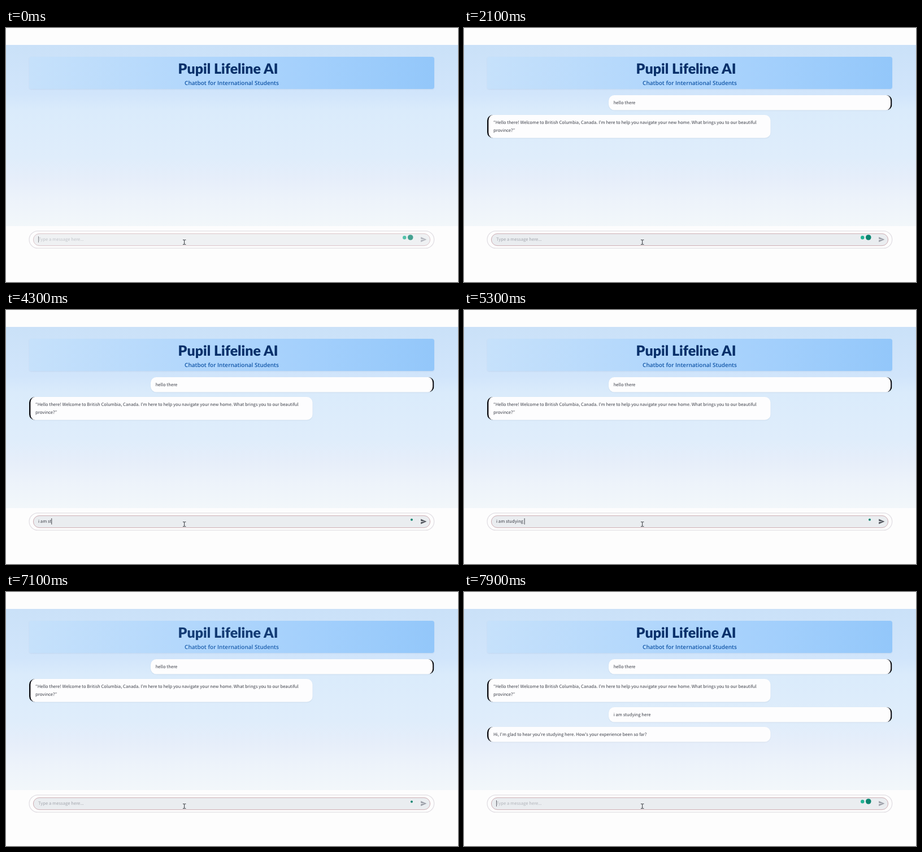
These frames come from a looping animation (800 by 450 pixels, 8000 ms). An HTML page:

```html
<!DOCTYPE html>
<html lang="en">
<head>
<meta charset="utf-8">
<title>Student chatbot</title>
<style>
html, body { margin: 0; width: 100%; height: 100%; overflow: hidden; background: #fdfdfd; }
#stage { position: relative; width: 800px; height: 450px; overflow: hidden; background: #fdfdfd; }
#stage > * { position: absolute; box-sizing: border-box; }
.sky {
  left: 0; top: 30px; width: 800px; height: 321px;
  background: linear-gradient(#cae1f8, #d1e5fb 27%, #daebfb 36%, #dfedfb 62%, #e6eefa 74%, #edf3fa 86%, #f2f7fa);
}
.header {
  left: 41px; top: 51px; width: 716.5px; height: 56.5px; border-radius: 4px;
  background: linear-gradient(90deg, #c6e1fb, #b2d7fc 40%, #a2cffc 72%, #93c7fa);
  box-shadow: 0 1px 2px rgba(60, 100, 160, .1);
}
/* Drawn larger and scaled down, so the dark edge can be 2.4px wide. */
.bubble {
  width: 627px; background: #fdfdfe; border-radius: 12.5px;
  box-shadow: 0 1px 2px rgba(40, 60, 90, .1);
  transform: scale(.8); transform-origin: 0 0;
}
.user { left: 256px; border-right: 3px solid #0b0b10; }
.bot { left: 41px; border-left: 3px solid #0b0b10; }
svg { left: 0; top: 0; }
text {
  font: 7.7px "Noto Sans CJK JP", "Noto Sans CJK SC", "Noto Sans CJK", "Open Sans", sans-serif;
  fill: #3c3f48; white-space: pre; text-rendering: geometricPrecision;
}
.title { font: 900 25px Lato, "Open Sans", sans-serif; fill: #08306a; }
.subtitle { font: 600 10px "Open Sans", "Noto Sans", sans-serif; fill: #1156a8; }
.middle { text-anchor: middle; }
#hint { fill: #a3a6ad; }
</style>
</head>
<body>
<div id="stage">
  <div class="sky"></div>
  <div class="header"></div>
  <svg id="art" width="800" height="450" viewBox="0 0 800 450">
    <rect x="41.1" y="359.6" width="716.6" height="30.6" rx="15.3" fill="#fdfdfd" stroke="#e2dfe4" stroke-width="1.3"/>
    <rect id="field" x="48.4" y="364.4" width="702.2" height="21.2" rx="10.6" fill="#eaedf0" stroke="#c8a4ab" stroke-width=".9"/>
    <g id="heading">
      <text class="title middle" x="393" y="81">Pupil Lifeline AI</text>
      <text class="subtitle middle" x="399.5" y="101.3">Chatbot for International Students</text>
    </g>
    <text id="hint" x="57" y="377.4">Type a message here...</text>
    <text id="typed" x="57" y="377.4"></text>
    <rect id="caret" y="369" width="0.9" height="11" fill="#30333b"/>
    <g id="badges">
      <circle cx="705.3" cy="371.3" r="3.2" fill="#22b394"/>
      <circle cx="715.8" cy="371" r="4.8" fill="#0c8570"/>
    </g>
    <circle id="dot" cx="718" cy="371.4" r="2" fill="#0c8570"/>
    <path id="send" transform="translate(733.2 368.9) scale(.49)" d="M2 21 23 12 2 3v7l15 2-15 2z"/>
    <path d="M313 375.4h2l.7.5.7-.5h2M315.7 375.6v7.8M313 383.4h2l.7-.5.7.5h2" fill="none" stroke="#33363c"/>
  </svg>
</div>
<script>
const LOOP = 8000, SENT = 6800, REPLY = 7500;
const el = id => document.getElementById(id);
const [stage, art, field, heading, hint, typed, caret, badges, dot, send] =
  ["stage", "art", "field", "heading", "hint", "typed", "caret", "badges", "dot", "send"].map(el);

const messages = [
  { who: "user", top: 119, height: 26.5, at: 200, lines: ["hello there"] },
  { who: "bot", top: 154, height: 40.5, at: 200, lines: [
    "“Hello there! Welcome to British Columbia, Canada. I'm here to help you navigate your new home. What brings you to our beautiful",
    "province?”"] },
  { who: "user", top: 203.5, height: 26.5, at: REPLY, lines: ["i am studying here"] },
  { who: "bot", top: 238.5, height: 26.5, at: REPLY, lines: [
    "Hi, I'm glad to hear you're studying here. How's your experience been so far?"] }
];

const draft = "i am studying here";
const keyTimes = [3600, 3700, 3800, 3900, 4000, 4100, 4300, 4400, 4500, 4600,
  4800, 4900, 5000, 5100, 5400, 5500, 5600, 5700];
const caretOff = [[1100, 1600], [2100, 2500], [3000, 3600], [6200, 6700], [SENT, REPLY]];

function addMessage({ who, top, height, at, lines }) {
  const bubble = document.createElement("div");
  bubble.className = "bubble " + who;
  bubble.style.top = top + "px";
  bubble.style.height = height / .8 + "px";
  stage.insertBefore(bubble, art);
  const texts = lines.map((line, i) => {
    const text = document.createElementNS(art.namespaceURI, "text");
    text.setAttribute("x", who === "user" ? 264.7 : 52);
    text.setAttribute("y", top + 16 + i * 13.5);
    text.textContent = line;
    return art.appendChild(text);
  });
  return { at, parts: [bubble, ...texts] };
}
const shown = messages.map(addMessage);

const show = (node, on) => { node.style.visibility = on ? "visible" : "hidden"; };
const ramp = (t, from, to) => Math.min(1, Math.max(0, (t - from) / (to - from)));

function render(t) {
  const count = t < SENT ? keyTimes.filter(k => k <= t).length : 0;
  const waking = ramp(t, 0, 400);
  const fresh = t >= REPLY;

  for (const { at, parts } of shown) parts.forEach(p => show(p, t >= at));

  typed.textContent = draft.slice(0, count);
  caret.setAttribute("x", 57 + (count ? typed.getComputedTextLength() : 0));
  show(caret, !caretOff.some(([from, to]) => t >= from && t < to));
  show(hint, !count);
  hint.style.opacity = caret.style.opacity = fresh ? .8 : .6 + .4 * waking;

  const typing = t >= keyTimes[0] && !fresh;
  show(badges, !typing);
  show(dot, typing);
  badges.style.opacity = .75 + .25 * waking;
  send.style.fill = count ? "#50535b" : "#9a9da6";
  send.style.opacity = field.style.opacity = .7 + .3 * waking;
  heading.style.opacity = 1 - .07 * (ramp(t, SENT, 7000) - ramp(t, REPLY, 7700));
}

function tick() {
  render(performance.now() % LOOP);
  requestAnimationFrame(tick);
}
tick();
</script>
</body>
</html>
```
